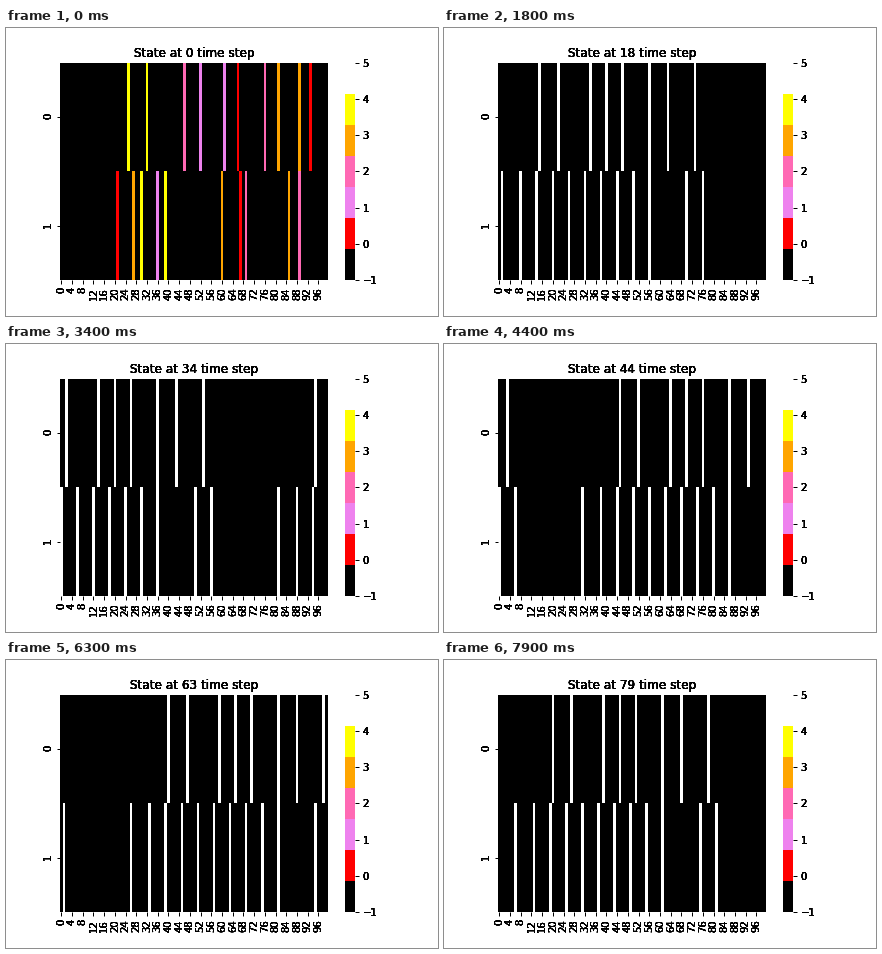
A matplotlib script that plays this animation: 432 by 288 pixels, repeating every 8000 ms.

```python
import numpy as np
import matplotlib.pyplot as plt
from matplotlib.animation import FuncAnimation
from matplotlib.colors import ListedColormap
from matplotlib.transforms import ScaledTranslation

plt.rcParams["font.family"] = "DejaVu Sans"

CELLS, STEPS, VMAX = 100, 80, 5
COLORS = ["black", "red", "violet", "hotpink", "orange", "yellow", "white"]
INK = 8  # text is overdrawn to get solid, heavy glyphs

# (cell, speed) of every car, per lane
LANES = [
    [(25, 4), (32, 4), (46, 2), (52, 1), (61, 1),
     (66, 0), (76, 2), (81, 3), (89, 3), (93, 0)],
    [(21, 0), (27, 3), (30, 4), (36, 1), (39, 4),
     (60, 3), (67, 0), (69, 2), (85, 3), (89, 2)],
]
# cars are numbered lane by lane
SWITCH = {(2, 2), (4, 6)}                                      # (step, car)
BRAKE = {(4, 6): 3, (5, 6): 3, (4, 8): 3, (5, 8): 3, (8, 7): 4}  # speed caps


def simulate():
    """Two-lane ring road: accelerate, keep distance, move."""
    lane = np.repeat([0, 1], [len(row) for row in LANES])
    pos, speed = np.array(LANES[0] + LANES[1]).T
    states = []
    for step in range(STEPS):
        grid = np.full((2, CELLS), -1)
        grid[lane, pos] = speed
        states.append(grid)
        for when, car in SWITCH:
            if when == step:
                lane[car] = 1 - lane[car]
        new = np.empty_like(speed)
        for i in range(len(pos)):
            ahead = (pos[lane == lane[i]] - pos[i]) % CELLS
            gap = ahead[ahead > 0].min() - 1
            new[i] = min(speed[i] + 1, VMAX, gap, BRAKE.get((step, i), VMAX))
        speed = new
        pos = (pos + speed) % CELLS
    return states


def bold_text(ax, x, y, s, **kw):
    return [ax.text(x, y, s, color="black", **kw) for _ in range(INK)]


def tick_text(ax, x, y, s, placement, rotation=0):
    trans, va, ha = placement
    bold_text(ax, x, y, s, transform=trans, va=va, ha=ha,
              rotation=rotation, fontsize=10)


states = simulate()
fig = plt.figure(figsize=(6, 4), dpi=72, facecolor="white")
left, bottom, width, height = 0.125, 0.125, 0.775, 0.755
ax = fig.add_axes([left, bottom, 0.8 * width, height])
cax = fig.add_axes([left + 0.85 * width, bottom, height * 4 / 20 / 6, height])

mesh = ax.pcolormesh(states[0], cmap=ListedColormap(COLORS), vmin=-1, vmax=VMAX)
ax.set(xlim=(0, CELLS), ylim=(2, 0))
for spine in ax.spines.values():
    spine.set_visible(False)
ax.set_xticks(np.arange(0, CELLS, 4) + 0.5)
ax.set_yticks([0.5, 1.5])
ax.tick_params(width=1, labelbottom=False, labelleft=False)

bar = fig.colorbar(mesh, cax=cax, ticks=range(-1, VMAX + 1))
bar.outline.set_visible(False)
cax.tick_params(width=1, labelright=False)

PAD = 7
for n in range(0, CELLS, 4):
    tick_text(ax, n + 0.5, 0, str(n), ax.get_xaxis_text1_transform(PAD), 90)
for n in range(2):
    tick_text(ax, 0, n + 0.5, str(n), ax.get_yaxis_text1_transform(PAD), 90)
for n in range(-1, VMAX + 1):
    tick_text(cax, 1, n, str(n).replace("-", "\u2212"),
              cax.get_yaxis_text2_transform(PAD))

above = ax.transAxes + ScaledTranslation(0, 6 / 72, fig.dpi_scale_trans)
titles = bold_text(ax, 0.5, 1, "", transform=above, ha="center",
                   va="baseline", fontsize=12)


def update(step):
    mesh.set_array(states[step])
    for title in titles:
        title.set_text(f"State at {step} time step")
    return [mesh, *titles]


anim = FuncAnimation(fig, update, frames=STEPS, interval=100, repeat=True)
plt.show()
```
